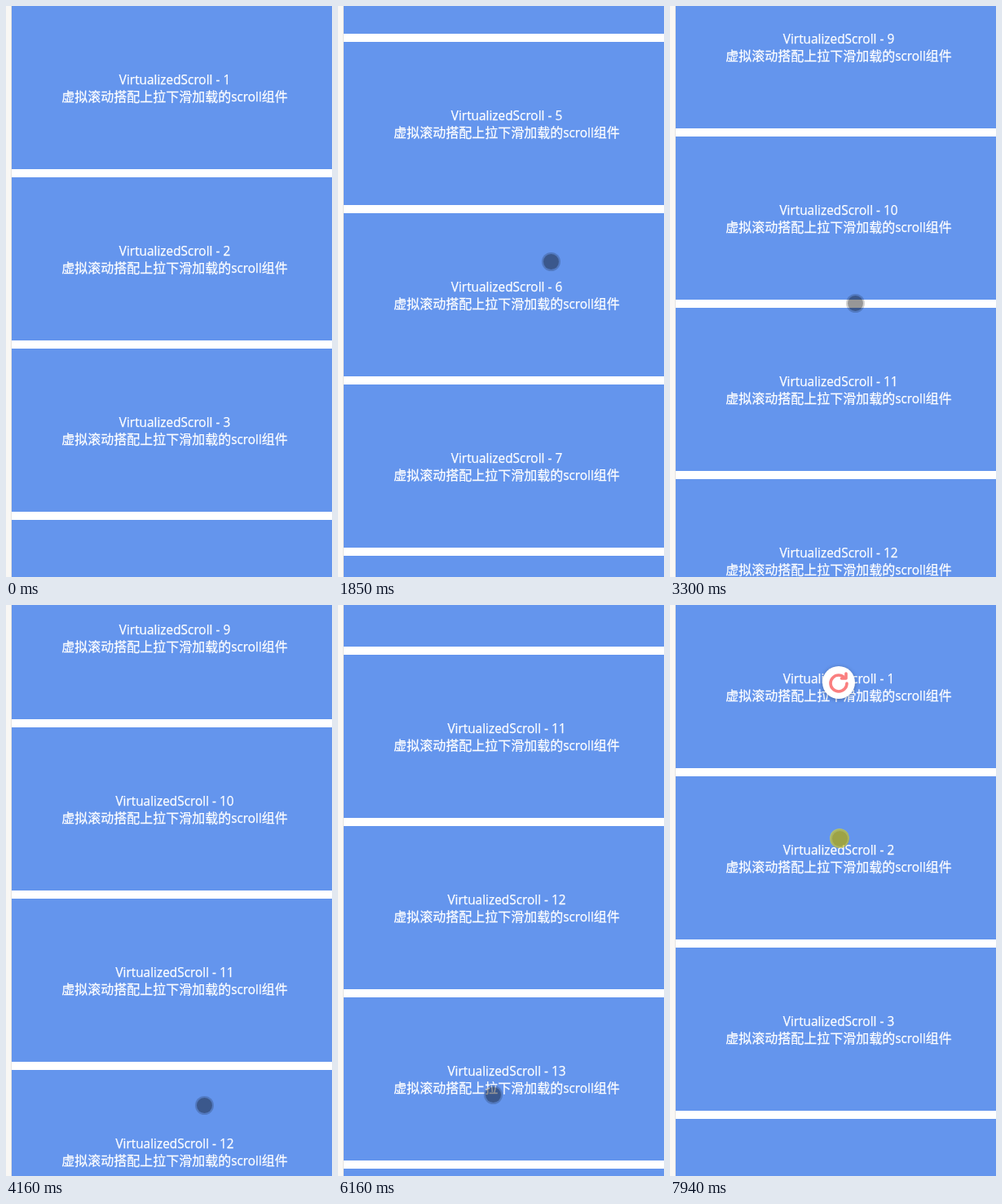
Recreate the animation shown at these times as an HTML page with a canvas. Size 400 by 700 pixels, loop 8 s.

```html
<!DOCTYPE html>
<html lang="zh">
<head>
<meta charset="utf-8">
<style>
  html, body { margin: 0; width: 100%; height: 100%; overflow: hidden; background: #fff; }
  canvas { display: block; }
</style>
</head>
<body>
<canvas id="stage" width="400" height="700"></canvas>
<script>
const ctx = document.getElementById('stage').getContext('2d');
const LOOP = 8000, FIRST_HOLD = 140, TICK = 77.2;
const LEFT = 7, CENTER = 207, CARD = 200, PITCH = 210;
const LATIN = '15.4px "Open Sans", "Noto Sans", sans-serif';
const HAN = '16px "Noto Sans CJK SC", "Noto Sans CJK", sans-serif';

// Ticks a finger needs to drag, and to reach the next press
const DRAG = 4, TRAVEL = 4;
const ENTRY = { x: 330, y: -20 };

// Each swipe presses at a tick, drags, and lets the list glide to a scroll position
const swipe = (at, glide, scroll, x, y, toX, toY) =>
  ({ at, glide, scroll, press: { x, y }, release: { x: toX, y: toY } });
const swipes = [
  swipe(10, 12, 796, 268, 655, 261, 313),
  swipe(27, 15.6, 1740, 245, 620, 227, 364),
  swipe(53, 11, 2790, 243, 613, 238, 228),
  swipe(70, 16, 1788, 238, 228, 190, 600),
  swipe(87, 11, 0, 165, 372, 195, 655),
  swipe(99, 1, 0, 209, 195, 208, 316)
];
const pull = swipes[swipes.length - 1];

const clamp = p => Math.min(1, Math.max(0, p));
const easeOut = p => 1 - (1 - p) ** 2;
const mix = (a, b, p) => a + (b - a) * p;
const between = (a, b, p) => ({ x: Math.round(mix(a.x, b.x, p)), y: Math.round(mix(a.y, b.y, p)) });

function scrollAt(tick) {
  return Math.round(swipes.reduce(
    (pos, s) => mix(pos, s.scroll, easeOut(clamp((tick - s.at) / s.glide))), 0));
}

function pointerAt(tick) {
  return swipes.reduce((pos, s) => {
    if (tick < s.at) return between(pos, s.press, clamp(1 - (s.at - tick) / TRAVEL));
    return between(s.press, s.release, clamp((tick - s.at) / DRAG));
  }, ENTRY);
}

function disc(x, y, r, color) {
  ctx.fillStyle = color;
  ctx.beginPath();
  ctx.arc(x, y, r, 0, Math.PI * 2);
  ctx.fill();
}

function centeredText(runs, y) {
  const widths = runs.map(([text, font]) => {
    ctx.font = font;
    return ctx.measureText(text).width;
  });
  let x = CENTER - widths.reduce((sum, w) => sum + w, 0) / 2;
  runs.forEach(([text, font], i) => {
    ctx.font = font;
    ctx.fillText(text, x, y);
    ctx.strokeText(text, x, y);
    x += widths[i];
  });
}

function drawCards(scroll) {
  ctx.strokeStyle = '#fff';
  ctx.lineWidth = 0.25;
  for (let i = Math.floor(scroll / PITCH); i * PITCH - scroll < 700; i++) {
    const y = i * PITCH - scroll;
    ctx.fillStyle = '#6495ed';
    ctx.fillRect(LEFT, y, 400, CARD);
    ctx.fillStyle = '#fff';
    centeredText([[`VirtualizedScroll - ${i + 1}`, LATIN]], y + 96);
    centeredText([['虚拟滚动搭配上拉下滑加载的', HAN], ['scroll', LATIN], ['组件', HAN]], y + 117);
  }
}

function drawEdge() {
  ctx.fillStyle = '#f9f7f4';
  ctx.fillRect(0, 0, LEFT, 700);
  ctx.fillStyle = '#e6e4e2';
  ctx.fillRect(LEFT - 1, 0, 1, 700);
}

function drawRefresh(y) {
  ctx.save();
  ctx.translate(CENTER, y);
  ctx.shadowColor = 'rgba(0,0,0,.3)';
  ctx.shadowBlur = 5;
  ctx.shadowOffsetY = 1;
  disc(0, 0, 20, '#fff');
  ctx.shadowColor = 'transparent';
  ctx.strokeStyle = '#fa7f7f';
  ctx.lineWidth = 3.6;
  ctx.lineCap = ctx.lineJoin = 'round';
  ctx.beginPath();
  ctx.arc(0, 1, 10, 0, Math.PI * 1.7);
  ctx.stroke();
  ctx.beginPath();
  ctx.moveTo(9, -11);
  ctx.lineTo(9, -5);
  ctx.lineTo(3.5, -5);
  ctx.stroke();
  ctx.restore();
}

function drawPointer({ x, y }, pressed) {
  disc(x + 0.5, y + 0.5, 11.5, 'rgba(0,0,0,.18)');
  disc(x + 0.5, y + 0.5, 9.5, 'rgba(0,0,0,.28)');
  if (pressed) disc(x, y, 12, 'rgba(255,238,0,.5)');
}

function draw(now) {
  const time = now % LOOP;
  // The picture advances in steady steps, like a screen recording
  const tick = time < FIRST_HOLD ? 0 : 1 + Math.floor((time - FIRST_HOLD) / TICK);
  const pointer = pointerAt(tick);
  ctx.fillStyle = '#fff';
  ctx.fillRect(0, 0, 400, 700);
  drawCards(scrollAt(tick));
  drawEdge();
  if (tick > pull.at) drawRefresh(pointer.y - 191);
  drawPointer(pointer, swipes.some(s => tick > s.at && tick < s.at + DRAG));
}

const start = performance.now();
function loop() {
  draw(performance.now() - start);
  requestAnimationFrame(loop);
}
loop();
</script>
</body>
</html>
```
